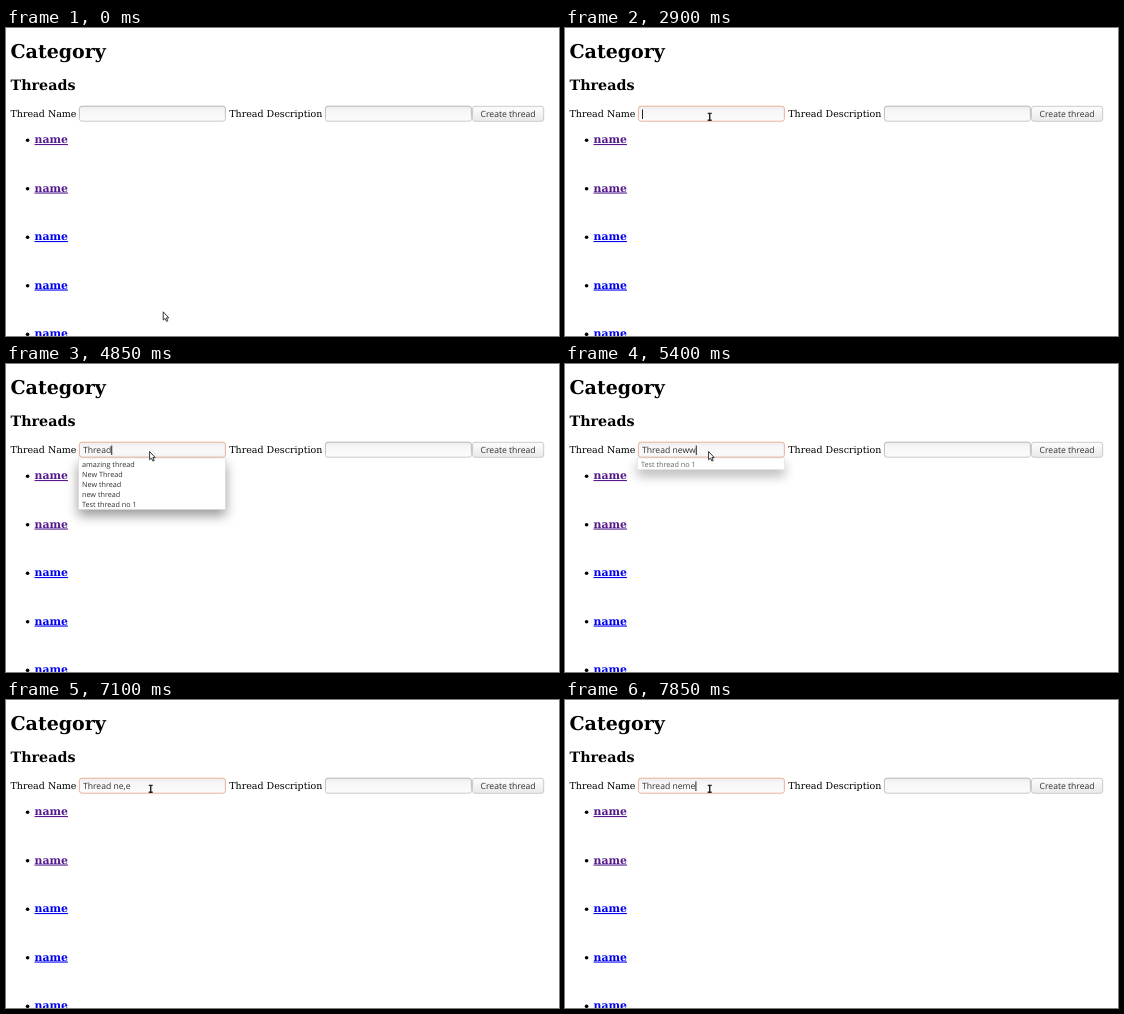
Animation of 553x308 px, one loop 8 s. Source, as an HTML page:

```html
<!DOCTYPE html>
<html lang="en">
<head>
<meta charset="utf-8">
<title>Category</title>
<style>
  html, body { margin: 0; width: 100%; height: 100%; overflow: hidden; background: #fff; }
  svg { display: block; width: 553px; height: 308px; }
  text { font: 9.5px "DejaVu Serif", serif; text-rendering: geometricPrecision; white-space: pre; }
  .h1 { font-size: 19px; font-weight: bold; }
  .h2 { font-size: 14.3px; font-weight: bold; }
  .link { font-size: 10.9px; font-weight: bold; fill: #00e; text-decoration: underline; }
  .visited { fill: #551a8b; }
  .ui { font: 500 8.6px "Open Sans", "Noto Sans", sans-serif; fill: #303030; }
  .item { font-size: 7.25px; }
  .box { fill: url(#field); stroke: url(#edge); }
  .focus { stroke: #ebb198; }
  #popup rect { fill: #fff; stroke: #dad8d5; stroke-width: .6; filter: drop-shadow(0 6px 6px rgba(0,0,0,.4)); }
</style>
</head>
<body>
<svg viewBox="0 0 553 308">
  <defs>
    <linearGradient id="field" x2="0" y2="1">
      <stop stop-color="#ececec"/><stop offset=".3" stop-color="#f6f6f6"/><stop offset="1" stop-color="#fcfcfc"/>
    </linearGradient>
    <linearGradient id="edge" x2="0" y2="1">
      <stop stop-color="#b8b5b1"/><stop offset="1" stop-color="#cbc8c4"/>
    </linearGradient>
    <linearGradient id="button" x2="0" y2="1">
      <stop stop-color="#fdfdfd"/><stop offset="1" stop-color="#e9e9e9"/>
    </linearGradient>
  </defs>
  <text class="h1" x="4.5" y="30.2">Category</text>
  <text class="h2" x="4.5" y="61.9">Threads</text>
  <text x="4.5" y="89.2">Thread Name</text>
  <text x="223.2" y="89.2">Thread Description</text>
  <rect id="nameBox" class="box" x="73.4" y="78.2" width="146" height="15" rx="2.5"/>
  <rect class="box" x="319.4" y="78.2" width="146" height="15" rx="2.5"/>
  <rect x="466.5" y="78.3" width="71.2" height="15" rx="2.5" fill="url(#button)" stroke="#cdcac6"/>
  <text class="ui" x="474.6" y="89.4">Create thread</text>
  <g id="threads"></g>
  <text id="typed" class="ui" x="77" y="89.4" xml:space="preserve"></text>
  <rect id="caret" y="81.5" width="1" height="9.5" fill="#222"/>
  <g id="popup"><rect x="72.5" y="94" width="147"/><g id="items"></g></g>
  <path id="arrow" d="M.4 .3V8.6L2.3 6.9L3.7 9.9L5 9.3L3.7 6.4H6Z" fill="#fff" stroke="#222" stroke-width=".9"/>
  <path id="beam" d="M-2 -3.4H2M-2 3.4H2M0 -3.4V3.4" fill="none" stroke="#222" stroke-width="1.4"/>
</svg>
<script>
const LOOP = 8000, STEP = 50;
const $ = id => document.getElementById(id);
const clamp = v => Math.max(0, Math.min(1, v));
const show = (el, on) => el.style.display = on ? "" : "none";

for (let i = 0; i < 5; i++) {
  const y = 115 + 48.5 * i;
  $("threads").innerHTML += `<circle cx="21.6" cy="${y - 2.7}" r="1.8"/>
    <text class="link ${i < 2 ? "visited" : ""}" x="28.5" y="${y}">name</text>`;
}

const suggestions = ["amazing thread", "New Thread", "New thread", "new thread", "Test thread no 1"];

// [start time, field content]
const typing = [
  [0, ""], [2050, "L,"], [2300, "L"], [2900, ""],
  [4300, "T"], [4450, "Th"], [4550, "Thr"], [4700, "Thre"], [4850, "Thread"], [5000, "Thread "],
  [5200, "Thread n"], [5250, "Thread ne"], [5300, "Thread neww"],
  [6100, "Thread new"], [6200, "Thread ne"], [6450, "Thread ne,"], [6500, "Thread ne,e"],
  [7300, "Thread ne,"], [7450, "Thread ne"], [7500, "Thread nem"], [7750, "Thread neme"]
];
const caretOff = [[0, 1050], [3500, 4300], [5900, 6100], [7100, 7300]];
const flashes = [[6100, 6250], [6450, 6550], [7450, 7550], [7750, 7850]];

// [time, x, y] of the pointer tip
const path = [[0, 156.8, 283.5], [100, 156.5, 298], [150, 156.5, 294], [450, 154, 163], [550, 154, 163], [1000, 144.7, 88.8]];

const within = (spans, t) => spans.find(([a, b]) => t >= a && t < b);

function pointerAt(t) {
  const i = path.findIndex(p => p[0] > t);
  if (i < 0) return path[path.length - 1].slice(1);
  const [t0, x0, y0] = path[i - 1], [t1, x1, y1] = path[i];
  const u = (t - t0) / (t1 - t0), k = u * u * (3 - 2 * u);
  return [x0 + (x1 - x0) * k, y0 + (y1 - y0) * k];
}

function popupAt(t) {
  if (t >= 4300 && t < 5550) {
    const fade = Math.min(clamp((t - 4250) / 200), clamp((5550 - t) / 200));
    return { items: t < 5250 ? suggestions : suggestions.slice(-1), opacity: fade };
  }
  const flash = within(flashes, t);
  return flash && { items: [], opacity: .8 * (flash[1] - t) / (flash[1] - flash[0]) };
}

function drawPopup(popup) {
  show($("popup"), popup);
  if (!popup) return;
  $("popup").setAttribute("opacity", popup.opacity);
  $("popup").firstChild.setAttribute("height", Math.max(4, popup.items.length * 10 + 1.5));
  $("items").innerHTML = popup.items
    .map((s, i) => `<text class="ui item" x="76" y="${102.6 + 10 * i}">${s}</text>`).join("");
}

function draw(t) {
  $("nameBox").classList.toggle("focus", t >= 1050);
  $("typed").textContent = typing.filter(([start]) => start <= t).pop()[1];
  $("caret").setAttribute("x", 77 + $("typed").getComputedTextLength());
  show($("caret"), !within(caretOff, t));

  const popup = popupAt(t);
  drawPopup(popup);

  let [x, y] = pointerAt(t);
  const overField = y < 94 && !popup;
  show($("arrow"), !overField);
  show($("beam"), overField);
  if (popup) { x -= 1.5; y -= 1.6; }
  $(overField ? "beam" : "arrow").setAttribute("transform", `translate(${x} ${y})`);
}

const begin = performance.now();
function frame() {
  const t = (performance.now() - begin) % LOOP;
  draw(Math.floor(t / STEP) * STEP);
  requestAnimationFrame(frame);
}
frame();
</script>
</body>
</html>
```
